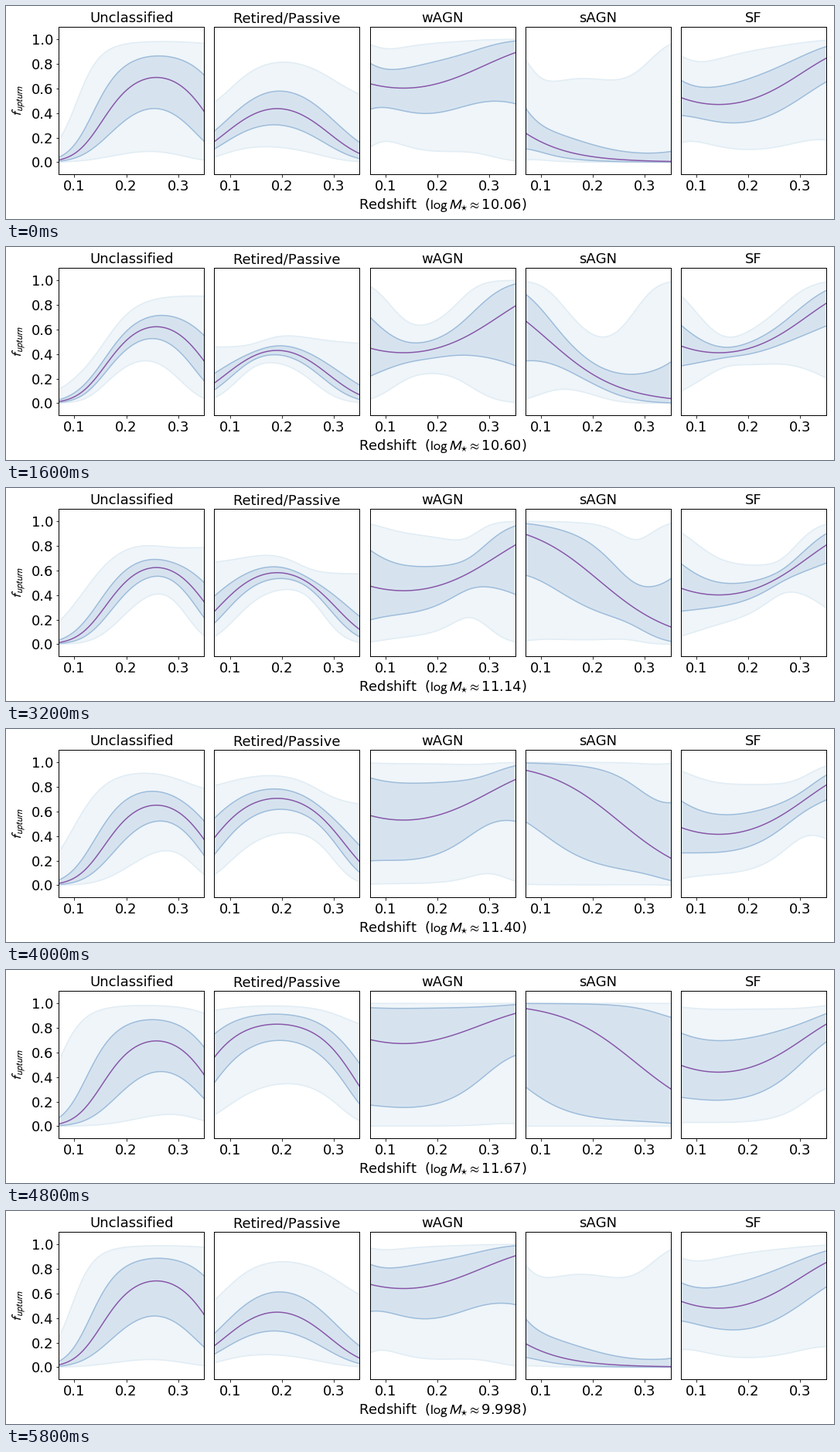
Write a matplotlib script that moves like this. It is 1071 px wide and 276 px high and loops after 6000 ms.

```python
import numpy as np
import matplotlib.pyplot as plt
from matplotlib.animation import FuncAnimation

W, H, DPI = 1071, 276, 72
N_FRAMES, INTERVAL = 30, 200
M_START, M_STEP = 9.998, 0.0672
Z_MIN, Z_MAX = 0.07, 0.35

plt.rcParams.update({
    "font.family": "DejaVu Sans",
    "font.size": 18,
    "mathtext.fontset": "stixsans",
    "text.kerning_factor": 6,
    "axes.linewidth": 1.0,
})

PALE, MID, DARK = "#e0ecf4", "#9ebcda", "#8856a7"

z = np.linspace(Z_MIN, Z_MAX, 60)


def logistic(x):
    return 1 / (1 + np.exp(-x))


def logit_mean(m, base, bend_m, m0, bend_z, z0):
    """Logit of the fraction: a parabola in mass plus one in redshift."""
    return base + bend_m * (m - m0)**2 + bend_z * (z - z0)**2


def logit_sd(m, scale, z_mid, z_width, m_mid, m_width, rho):
    """Standard error of a quadratic regression.

    The sample is a bivariate normal in (z, m) with correlation rho; the
    error grows with distance from the middle of that sample.
    """
    x, y = (z - z_mid) / z_width, (m - m_mid) / m_width
    linear = (x**2 - 2 * rho * x * y + y**2) / (1 - rho**2)
    p, q = x**2 - 1, y**2 - 1
    square = (p**2 - 2 * rho**2 * p * q + q**2) / (2 * (1 - rho**4))
    return scale * np.sqrt(1 + linear + square)


# title, arguments of logit_mean, arguments of logit_sd
PANELS = [
    ("Unclassified", (0.465, 0.53, 10.86, -136, 0.258),
     (0.21, 0.214, 0.0714, 10.84, 0.346, 0.66)),
    ("Retired/Passive", (-0.351, 1.11, 10.356, -92, 0.191),
     (0.097, 0.192, 0.0497, 10.81, 0.29, 0.65)),
    ("wAGN", (-0.425, 1.52, 10.81, 36.5, 0.135),
     (0.224, 0.183, 0.0511, 10.65, 0.295, 0.70)),
    ("sAGN", (-12.93, -0.78, 12.575, 3.4, 2.285),
     (0.36, 0.182, 0.063, 10.59, 0.325, 0.75)),
    ("SF", (-0.41, 0.345, 10.98, 42.6, 0.143),
     (0.125, 0.203, 0.0545, 10.79, 0.305, 0.75)),
]


class Panel:
    def __init__(self, fig, index, title, mean, spread):
        left, width, step = 68.3, 188, 201.12
        bottom, height = 57.7, 191
        self.mean, self.spread = mean, spread

        ax = fig.add_axes([(left + index * step) / W, bottom / H,
                           width / W, height / H])
        ax.set(xlim=(Z_MIN, Z_MAX), ylim=(-0.1, 1.1), xticks=[0.1, 0.2, 0.3])
        ax.set_yticks(np.arange(0, 1.1, 0.2) if index == 0 else [])
        ax.set_title(title, fontsize=18, pad=6)

        blank = np.zeros_like(z)
        self.bands = []
        for n_sd, color, alpha in ((3, PALE, 0.5), (1, MID, 0.3)):
            fill, = ax.fill(z, blank, color=color, alpha=alpha, lw=0, zorder=1)
            edges = [ax.plot(z, blank, color=color, lw=1.5)[0] for _ in range(2)]
            self.bands.append((n_sd, fill, edges))
        self.median, = ax.plot(z, blank, color=DARK, lw=1.5)

    def update(self, m):
        mu, sd = logit_mean(m, *self.mean), logit_sd(m, *self.spread)
        for n_sd, fill, edges in self.bands:
            low, high = logistic(mu - n_sd * sd), logistic(mu + n_sd * sd)
            fill.set_xy(np.column_stack([np.r_[z, z[::-1]],
                                         np.r_[low, high[::-1]]]))
            edges[0].set_ydata(low)
            edges[1].set_ydata(high)
        self.median.set_ydata(logistic(mu))


fig = plt.figure(figsize=(W / DPI, H / DPI), dpi=DPI, facecolor="white")
panels = [Panel(fig, i, *spec) for i, spec in enumerate(PANELS)]
fig.text(17.5 / W, 153.5 / H, r"$f_{upturn}$", rotation=90,
         ha="center", va="center")
x_label = fig.text(564.5 / W, 13 / H, "", ha="center", va="baseline")


def update(frame):
    # The lightest mass comes last in the loop.
    m = M_START + M_STEP * ((frame + 1) % N_FRAMES)
    for panel in panels:
        panel.update(m)
    digits = f"{m:.6f}"[:5]
    x_label.set_text(rf"Redshift  ($\log M_{{\star}}\approx${digits})")
    return []


anim = FuncAnimation(fig, update, frames=N_FRAMES, interval=INTERVAL,
                     init_func=lambda: update(0), repeat=True, repeat_delay=0)
plt.show()
```
